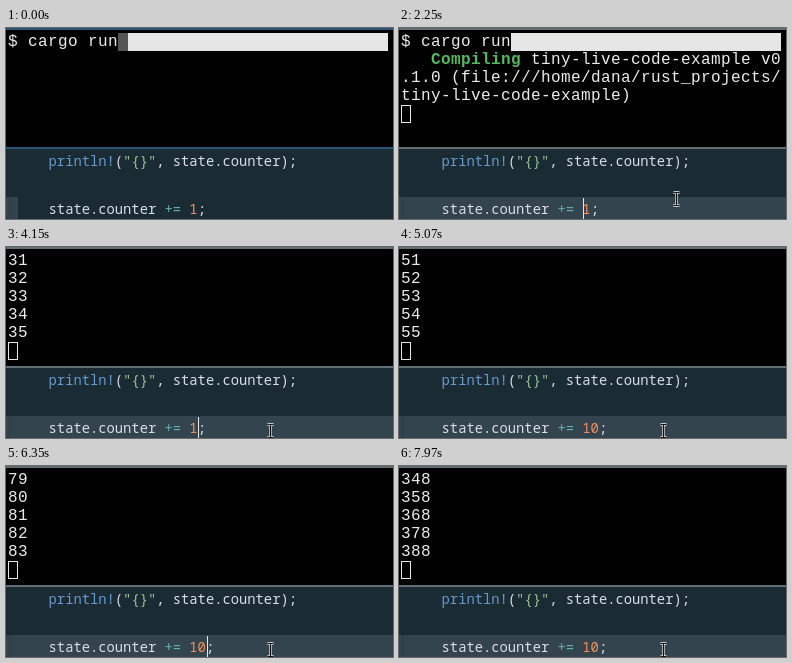
These frames come from a looping animation (387 px wide and 191 px high, 8 s). An HTML page:

```html
<!DOCTYPE html>
<html lang="en">
<head>
<meta charset="utf-8">
<title>Live coding counter</title>
<style>
  html, body { margin: 0; width: 100%; height: 100%; overflow: hidden; background: #000; }
  svg { display: block; width: 387px; height: 191px; }
  text { white-space: pre; }
  .term { font: 16px "Liberation Mono", monospace; letter-spacing: .4px; fill: #ececec; }
  .status { font-weight: bold; fill: #55b95f; }
  .code { font: 500 13.8px "Noto Sans Mono", monospace; fill: #d8dee9; }
  .macro { fill: #6699cc; }
  .str { fill: #99c794; }
  .op { fill: #5fb3b3; }
  .num { fill: #f99157; }
</style>
</head>
<body>
<svg viewBox="0 0 387 191">
  <rect width="387" height="191"/>
  <rect id="mask" x="112" width="270" height="18" fill="#e6e6e6"/>
  <g id="rows" class="term"></g>
  <rect id="block"/>

  <rect y="121" width="387" height="70" fill="#1b2b34"/>
  <rect class="bar" width="387" height="2"/>
  <rect class="bar" y="119" width="387" height="2"/>
  <rect id="line" y="169" height="22" fill="#34444e"/>
  <rect x="3" y="169" width="1" height="22" fill="#293942"/>
  <text class="code" x="42.6" y="138"><tspan class="macro">println!</tspan>(<tspan class="str">"{}"</tspan>, state.counter);</text>
  <text class="code" x="42.6" y="186">state.counter <tspan class="op">+=</tspan> <tspan id="step" class="num">1</tspan>;</text>
  <rect id="caret" y="170" width="1" height="21" fill="#e4e8ee"/>

  <g id="pointer" fill="none">
    <path d="M-3-6.5H3M0-6.5V6.5M-3 6.5H3" stroke="#f2f2f2" stroke-width="2.4"/>
    <path d="M-3-6.5H3M0-6.5V6.5M-3 6.5H3" stroke="#111" stroke-width="1.2"/>
  </g>
</svg>
<script>
const LOOP = 8000, ROWS = 6, CELL = 10, ROW_H = 18, LEFT = 2, TOP = 5;
const ENTER = 740, COMPILE = 990, MOVE = 1930, FOCUS = 2130, BUILT = 2420, RUN = 2570;
const TYPED = 4230, BLINK = 1060, RELOAD = 88;

// [time, lines printed so far]
const PRINTS = [[RUN, 1], [3210, 15], [5070, 55], [5830, 72], [6870, 95], [7970, 118], [8000, 118.6]];
// [time, x, y]
const PATH = [[MOVE, 330, 42], [2250, 277, 171], [BUILT, 268, 181], [2650, 264, 184]];
// [time, column]: each entry also restarts the blink
const CARET = [[FOCUS, 17], [2660, 19], [3950, 18], [TYPED, 19]];

// [time, plain text, bold status]
const LOG = [
  [0, "$ cargo run"],
  [COMPILE, " tiny-live-code-example v0", "   Compiling"],
  [COMPILE, ".1.0 (file:///home/dana/rust_projects/"],
  [COMPILE, "tiny-live-code-example)"],
  [BUILT, " debug [unoptimized + debug", "    Finished"],
  [BUILT, "info] target(s) in 1.31 secs"],
  [BUILT, " `target/debug/tiny-live-co", "     Running"],
  [BUILT, "de-example`"]
];

const $ = id => document.getElementById(id);
const set = (el, attrs) => {
  for (const key in attrs) el.setAttribute(key, attrs[key]);
};

const rows = Array.from({ length: ROWS }, (_, i) => {
  const make = name => document.createElementNS("http://www.w3.org/2000/svg", name);
  const text = make("text"), status = make("tspan"), plain = make("tspan");
  set(text, { x: LEFT, y: TOP + 13 + i * ROW_H });
  set(status, { class: "status" });
  text.append(status, plain);
  $("rows").append(text);
  return { status, plain };
});

function track(keys, t, col) {
  if (t <= keys[0][0]) return keys[0][col];
  for (let i = 1; i < keys.length; i++) {
    const a = keys[i - 1], b = keys[i];
    if (t < b[0]) return a[col] + (b[col] - a[col]) * (t - a[0]) / (b[0] - a[0]);
  }
  return keys[keys.length - 1][col];
}

// The step grows from 1 to 10 once the new code is loaded.
const counter = n => n <= RELOAD ? n : RELOAD + (n - RELOAD) * 10;

function drawTerminal(t) {
  const log = LOG.filter(entry => t >= entry[0]);
  const printed = t < RUN ? 0 : Math.floor(track(PRINTS, t, 1) + 1e-6);
  const total = log.length + printed;
  const typing = t < ENTER;
  const cursorLine = typing ? 0 : total;
  const first = Math.max(0, cursorLine - ROWS + 1);

  rows.forEach((row, i) => {
    const n = first + i;
    const [, plain = "", status = ""] = n < log.length ? log[n]
      : n < total ? [0, String(counter(n - log.length + 1))] : [];
    row.status.textContent = status;
    row.plain.textContent = plain;
  });

  set($("mask"), { y: TOP, visibility: first ? "hidden" : "visible" });

  const x = typing ? LEFT + 11 * CELL : LEFT;
  const y = TOP + (cursorLine - first) * ROW_H;
  if (t < FOCUS) {
    set($("block"), { x, y, width: CELL, height: ROW_H, fill: typing ? "#555" : "#e6e6e6", stroke: "none" });
  } else {
    set($("block"), { x: x + .5, y: y + .5, width: CELL - 1, height: ROW_H - 1, fill: "none", stroke: "#e6e6e6" });
  }
}

function drawEditor(t) {
  const focused = t >= FOCUS;
  document.querySelectorAll(".bar").forEach(bar => set(bar, { fill: focused ? "#5f6f74" : "#285577" }));
  set($("line"), { width: focused ? 387 : 12 });
  $("step").textContent = t < TYPED ? "1" : "10";

  const key = CARET.filter(k => t >= k[0]).pop();
  const lit = key && (t - key[0]) % BLINK < BLINK / 2;
  set($("caret"), { visibility: lit ? "visible" : "hidden", x: key ? Math.round(43.3 + key[1] * 8.28) : 0 });
}

function draw(now) {
  const t = now % LOOP;
  drawTerminal(t);
  drawEditor(t);
  const px = Math.round(track(PATH, t, 1)) + .5, py = Math.round(track(PATH, t, 2));
  set($("pointer"), { transform: `translate(${px} ${py})`, visibility: t < MOVE ? "hidden" : "visible" });
}

const start = performance.now();
function tick() {
  draw(performance.now() - start);
  requestAnimationFrame(tick);
}
tick();
</script>
</body>
</html>
```
